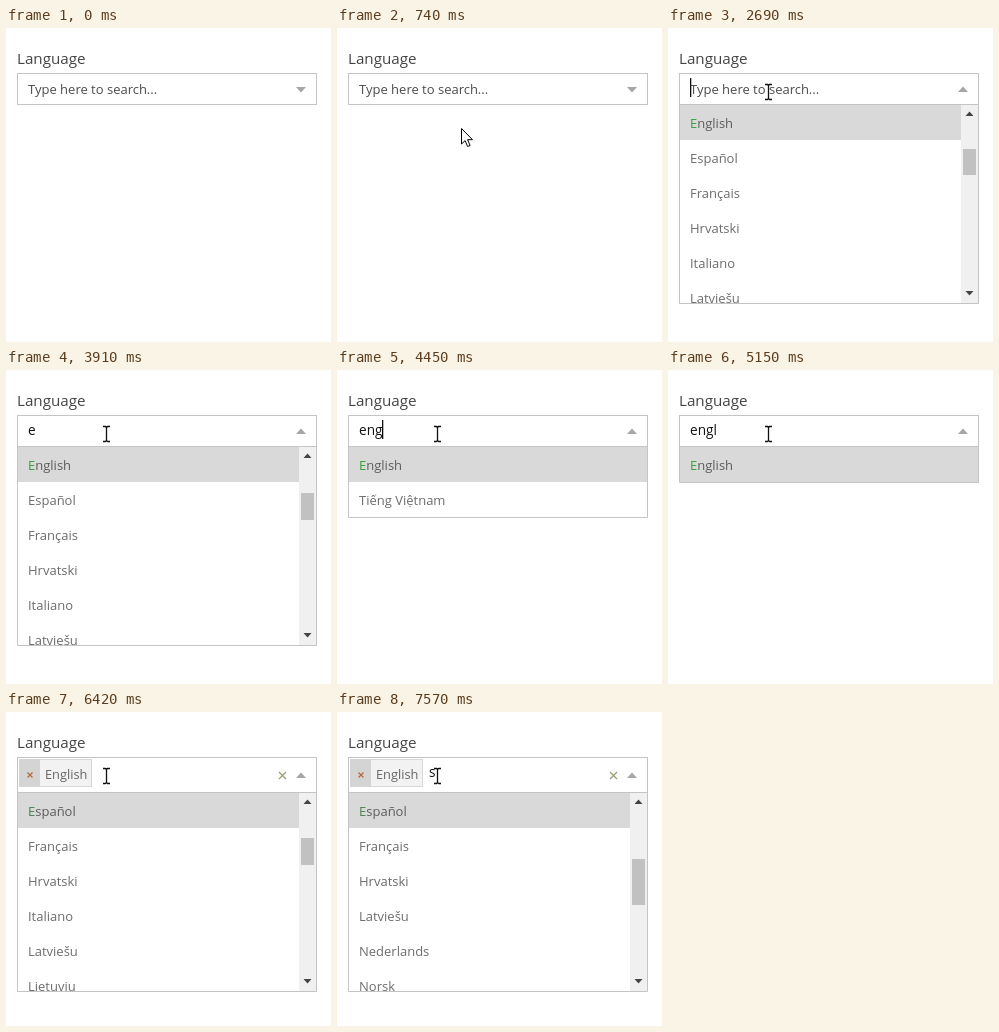
These frames come from a looping animation (325 by 314 pixels, 8 s). An HTML page:

```html
<!DOCTYPE html>
<html lang="en">
<head>
<meta charset="utf-8">
<title>Language picker</title>
<style>
  html, body { margin: 0; width: 100%; height: 100%; overflow: hidden; background: #fff; }
  svg { display: block; width: 325px; height: 314px; }
  text { font: 13px "Open Sans", "Noto Sans", sans-serif; white-space: pre; }
</style>
</head>
<body>
<svg id="stage" viewBox="0 0 325 314">
  <defs><clipPath id="clip"><rect id="clipRect" x="12" y="77" width="298"/></clipPath></defs>
  <text x="11" y="36" fill="#444" style="font-size:15.2px">Language</text>
  <rect id="field" x="11.5" y="45.5" width="299" fill="#fff" stroke="#c4c4c4"/>
  <g id="list"></g>
  <g id="tag">
    <rect x="13.5" y="47.5" width="72" height="27" fill="#f2f2f2" stroke="#d8d8d8"/>
    <rect x="13" y="47" width="21" height="28" fill="#d4d4d4"/>
    <path id="remove" d="M21.5 60.5l5 5m0-5l-5 5" stroke-width="1.2"/>
    <text x="39" y="67" fill="#666" style="font-size:12.8px">English</text>
    <path id="clear" d="M273 60l7 7m0-7l-7 7" stroke-width="1.3"/>
  </g>
  <path id="toggle" fill="#a6a6a6"/>
  <text id="input" y="66"></text>
  <rect id="caret" y="50" width="1.3" height="19" fill="#111"/>
  <path id="arrow" d="M.5.5v15.5l3.6-3.4 2.5 5.9 2.5-1-2.5-5.8h4.9z" fill="#fff" stroke="#000"/>
  <path id="beam" d="M97 56.5h2.5l1 1 1-1h2.5M100.5 57v14M97 71.5h2.5l1-1 1 1h2.5" fill="none" stroke="#111" stroke-width="1.3"/>
</svg>
<script>
const LOOP = 8000;
const $ = id => document.getElementById(id);
const set = (el, attrs) => { for (const k in attrs) el.setAttribute(k, attrs[k]); };
const show = (el, on) => el.setAttribute("visibility", on ? "visible" : "hidden");

const all = ["English", "Español", "Français", "Hrvatski", "Italiano", "Latviešu", "Lietuvių"];
const rest = all.slice(1);
const withEn = ["English", "Slovenčina", "Slovenščina", "Svenska", "Tiếng Việtnam"];
const withEng = ["English", "Tiếng Việtnam"];
const withS = ["Español", "Français", "Hrvatski", "Latviešu", "Nederlands", "Norsk"];

// Each state: start, typed text, caret x, caret-off spans, visible items, scroll thumb [top, bottom]
const states = [
  { at: 0, typed: "" },
  { at: 1680, typed: "", caret: 22, off: [[2140, 2690], [3220, 3450]], items: all.slice(0, 6), thumb: [121, 147] },
  { at: 3450, typed: "e", caret: 29, off: [[3910, 4220]], items: all.slice(0, 6), thumb: [123, 150] },
  { at: 4220, typed: "en", caret: 37, off: [], items: withEn },
  { at: 4450, typed: "eng", caret: 45, off: [], items: withEng },
  { at: 4600, typed: "engl", caret: 49, off: [[5150, 5700]], items: ["English"] },
  { at: 5700, typed: "", caret: 92, off: [[6420, 6950]], items: rest, thumb: [126, 153], tagged: true },
  { at: 7120, typed: "s", caret: 98, off: [[7570, 8000]], items: withS, thumb: [147, 193], tagged: true }
];

function rect(x, y, w, h, fill) {
  return `<rect x="${x}" y="${y}" width="${w}" height="${h}" fill="${fill}"/>`;
}

function row(name, i, top) {
  const y = top + i * 35;
  const first = i ? name[0] : `<tspan fill="${name === "English" ? "#35a035" : "#47804f"}">${name[0]}</tspan>`;
  return (i ? "" : rect(12, y, 298, 35, "#d9d9d9")) +
    `<text x="22" y="${y + 23}" fill="${i ? "#6c6c6c" : "#5c5c5c"}">${first}${name.slice(1)}</text>`;
}

function scrollbar(top, bottom, [a, b]) {
  return rect(293, top, 17, bottom - top, "#f0f0f0") +
    rect(295, a, 13, b - a, "#c1c1c1") +
    `<path d="M297.5 ${top + 11}h8l-4-4.5zM297.5 ${bottom - 12}h8l-4 4.5z" fill="#444"/>`;
}

function drawList(s) {
  const top = s.tagged ? 81 : 77;
  const bottom = s.thumb ? top + 198 : top + s.items.length * 35;
  set($("clipRect"), { y: top, height: bottom - top });
  $("list").innerHTML =
    `<g clip-path="url(#clip)">${s.items.map((n, i) => row(n, i, top)).join("")}` +
    (s.thumb ? scrollbar(top, bottom, s.thumb) : "") + "</g>" +
    `<path d="M11.5 ${top - 1}V${bottom + .5}H310.5V${top - 1}" fill="none" stroke="#c4c4c4"/>`;
}

function drawState(s) {
  const open = !!s.items, tagged = !!s.tagged;
  set($("field"), { height: tagged ? 35 : 31, stroke: "#c4c4c4" });
  if (open) drawList(s); else $("list").innerHTML = "";
  show($("tag"), tagged);
  const y = tagged ? 66 : 64;
  set($("toggle"), { d: open ? `M290 ${y}h10l-5-5.5z` : "M290 59h10l-5 5.5z" });
  const hint = !s.typed && !tagged;
  const input = $("input");
  input.textContent = hint ? "Type here to search..." : s.typed;
  set(input, { x: tagged ? 92 : 22, y: hint ? 66 : 65, fill: hint ? "#4c4c4c" : "#111" });
  input.style.fontSize = hint ? "13px" : "13.6px";
}

function drawPointer(t) {
  const moving = t >= 350 && t < 1580;
  show($("arrow"), moving);
  show($("beam"), t >= 1580);
  if (!moving) return;
  const p = Math.min(8, Math.floor((t - 350) / 77.5)) / 8;
  const k = 1 - (1 - p) ** 1.6;
  set($("arrow"), { transform: `translate(${Math.round(221 - 122 * k)} ${Math.round(242 - 179 * k)})` });
}

let current;
function draw(t) {
  const s = states.findLast(x => t >= x.at);
  if (s !== current) drawState(current = s);
  const lit = s.caret && !s.off.some(([a, b]) => t >= a && t < b);
  show($("caret"), lit);
  set($("caret"), { x: s.caret || 0 });
  set($("remove"), { stroke: t < 5800 ? "#777" : "#b5693a" });
  set($("clear"), { stroke: t < 5800 ? "#b4b4b4" : "#93a070" });
  drawPointer(t);
}

const start = performance.now();
function tick() {
  draw((performance.now() - start) % LOOP);
  requestAnimationFrame(tick);
}
tick();
</script>
</body>
</html>
```
